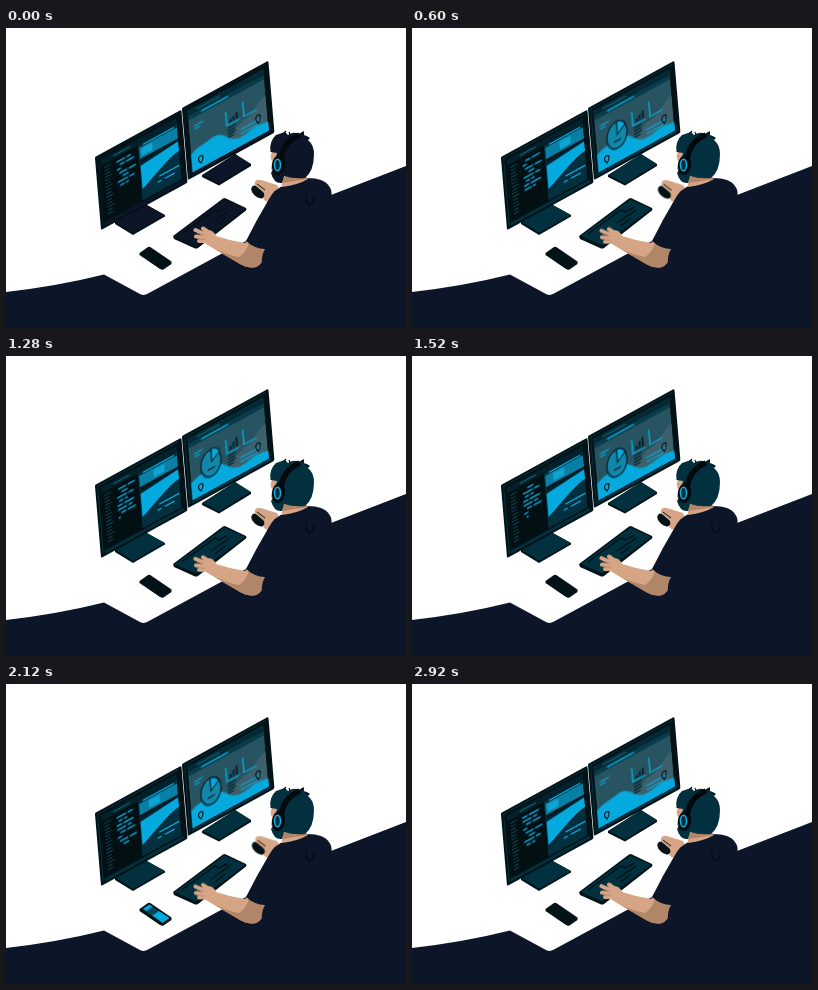
Write an HTML page that moves like this. It is 400x300 px and loops after 2960 ms.

```html
<!DOCTYPE html>
<html lang="en">
<head>
<meta charset="utf-8">
<title>Developer at work</title>
<style>
html, body { margin: 0; width: 100%; height: 100%; overflow: hidden; background: #fff; }
svg { display: block; width: 100vw; height: 100vh; }
:root { --navy: #0c1628; --teal: #03303e; --ink: #021216; --cyan: #04aadd; --skin: #d6a586; --shade: #b18568; }
.anim, .tint, .row { animation: 2960ms linear infinite; }
.tint { fill: var(--teal); animation-name: tint; }
.navy { fill: var(--navy); }
.ink { fill: var(--ink); }
.cyan { fill: var(--cyan); }
.skin { fill: var(--skin); }
.shade { fill: var(--shade); }
.line { fill: none; stroke: var(--cyan); stroke-width: 1.3; }
.dark { fill: none; stroke: #032029; stroke-width: 1.2; }
.digits { fill: none; stroke: var(--skin); stroke-width: 4; stroke-linecap: round; stroke-linejoin: round; }
.scroll { animation-name: scroll; animation-timing-function: steps(8); }
.row { animation-name: type; transform-box: fill-box; transform-origin: left; }
.slide { animation-name: slide; }
.pie { animation-name: pie; transform-box: fill-box; transform-origin: center; }
.slice { animation-name: slice; }
.bar { animation-name: bar; transform-box: fill-box; transform-origin: bottom; }
.wave { animation-name: wave; }
.phone { animation-name: phone; }
.feed { animation-name: feed; }
.fold { animation-name: fold; }
.fingers { animation: tap 370ms ease-in-out infinite; }
.mouse { animation-name: nudge; animation-timing-function: ease-in-out; }
@keyframes tint { 0%, 1.34% { fill: #0c1628; } 1.35%, 100% { fill: #03303e; } }
@keyframes scroll { to { transform: translateY(-32px); } }
@keyframes type { 0% { transform: scaleX(0); } 10%, 100% { transform: none; } }
@keyframes slide {
  0%, 4%, 57%, 63%, 98%, 100% { transform: none; }
  12% { transform: translateX(5px); }
  20%, 45%, 77%, 90% { transform: translateX(12px); }
}
@keyframes pie { 0%, 2%, 98%, 100% { transform: scale(0); } 10%, 90% { transform: none; } }
@keyframes slice { 0%, 12% { transform: none; } 30%, 45% { transform: translate(1px, -1px); } 60%, 100% { transform: none; } }
@keyframes bar { 0%, 100% { transform: scaleY(.65); } 30% { transform: scaleY(.8); } 60% { transform: none; } 85% { transform: scaleY(.7); } }
@keyframes wave { 0%, 100% { transform: none; } 50% { transform: translateY(1px); } }
@keyframes phone { 0%, 56.6% { opacity: 0; } 58%, 93% { opacity: 1; } 95%, 100% { opacity: 0; } }
@keyframes feed { 0%, 60% { transform: none; } 75%, 100% { transform: translate(-5px, -3px); } }
@keyframes fold { 0%, 1.34% { opacity: 1; } 1.35%, 39.1% { opacity: 0; } 39.2%, 100% { opacity: 1; } }
@keyframes tap { 0%, 100% { transform: none; } 50% { transform: translateY(.8px); } }
@keyframes nudge { 0%, 50%, 100% { transform: none; } 20%, 80% { transform: translate(.6px, .3px); } }
</style>
</head>
<body>
<svg viewBox="0 0 400 300">
  <defs>
    <clipPath id="codeClip"><path d="M17 13H41V44H17Z"/></clipPath>
    <clipPath id="screenClip"><path d="M4 4H80V65H4Z"/></clipPath>
    <clipPath id="phoneClip"><path d="M136.500 225L143.500 220.500L163.500 234L156.500 239Z"/></clipPath>
  </defs>

  <!-- desk edge and chair side -->
  <path class="navy" d="M0 264Q52 258 98 246.500L134 266Q138 268 142 265.500L215 226L240 213L325 167L400 138V300H0Z"/>

  <!-- stands -->
  <path class="ink" d="M109 194L139 176L159 187V188.500L127 207L109 196Z"/>
  <path class="tint" d="M110 194L139 176L158.500 187L127 205Z"/>
  <path class="ink" d="M196 147L229 126L245 136V138L213 157.500L196 149Z"/>
  <path class="tint" d="M197 147L229 126L244.500 136L213 155.500Z"/>

  <!-- left monitor -->
  <g transform="matrix(1 -.5476 .0845 1 90 130)">
    <path class="ink" d="M0 -1.500H84Q85.500 -1.500 85.500 0V70Q85.500 71.500 84 71.500H.5Q-1 71.500 -1 70V0Q-1 -1.500 0 -1.500Z"/>
    <path class="tint" d="M1 .5H83V1.500H2V69H1ZM3 66.500H82V69.500H3Z"/>
    <g clip-path="url(#screenClip)">
      <path fill="#021014" d="M4 4H41V65H4Z"/>
      <path fill="#032f3f" d="M41 4H80V65H41Z"/>
      <path fill="#03212a" d="M4 4H80V10H4Z"/>
      <path fill="#087fa5" d="M42 13H80V24H42Z"/>
      <path class="anim slide" fill="#10a4d2" d="M44 14.500H55V22H44Z"/>
      <path class="cyan" d="M42 31L80 27V36.500C70 37 56 47 42 54Z"/>
      <path fill="#021a22" d="M42 24.500H80V26.500L42 28.500Z"/>
      <path class="line" d="M46 11.500H77M59 50.500H79M64 55.500H74M57 55.500H61" stroke-width="1"/>
      <path class="line" style="stroke:#0c6179" d="M17 7H33" stroke-width="1"/>
    </g>
    <g id="side" fill="#0c414f"></g>
    <g clip-path="url(#codeClip)"><g id="code" class="anim scroll cyan"></g></g>
  </g>

  <!-- right monitor -->
  <g transform="matrix(1 -.5476 .0845 1 177 81)">
    <path class="ink" d="M0 -1.500H84Q85.500 -1.500 85.500 0V69Q85.500 70.500 84 70.500H.5Q-1 70.500 -1 69V0Q-1 -1.500 0 -1.500Z"/>
    <path class="tint" d="M1 .5H83V1.500H2V68H1ZM3 66H82V68.500H3Z"/>
    <g clip-path="url(#screenClip)">
      <path fill="#285361" d="M4 4H80V65H4Z"/>
      <path fill="#032a36" d="M4 4H80V10H4Z"/>
      <path fill="#083c4a" d="M4 10H80V14H4Z"/>
      <path fill="#3c606c" d="M34 57C46 50 52 42 60 42S70 32 80 30V65H34Z"/>
      <path class="anim wave cyan" d="M4 48C12 43 16 45 24 43S36 46 42 52S54 58 62 56S74 55 81 57V68H4Z"/>
      <path class="line" d="M17 11.500H44M9 22H18M9 25H15M53 50H74M53 54H70"/>
      <path class="line" style="stroke:#0c6179" d="M13 7H36"/>
      <path class="dark" d="M69 9H71M73 9H75M77 9H79" stroke-width="2"/>
      <path class="dark" d="M41 42H49M41 45H48M41 48H49M41 51H47"/>
      <path class="line" stroke-width="1.500" d="M40.500 25V39H53M57.500 24.500V39H70"/>
      <g fill="#03222d">
        <path class="anim bar" d="M43.500 33H45.500V37.500H43.500Z"/>
        <path class="anim bar" d="M46.700 30H48.700V37.500H46.700Z"/>
        <path class="anim bar" d="M49.900 27H51.900V37.500H49.900Z"/>
      </g>
      <path class="dark" d="M13 61C10 58 10 54 13 54S16 58 13 61ZM71 53C68 50 68 45 71 45S74 50 71 53Z"/>
      <g class="anim pie">
        <ellipse cx="24.600" cy="39.500" rx="10" ry="13" fill="#1287aa" stroke="#032029" stroke-width="1.300"/>
        <g class="anim slice">
          <path class="cyan" d="M24.600 39.500V26.500Q30 27 33 33Z" stroke="#032029" stroke-width="1.200"/>
        </g>
        <path class="dark" d="M21 45H28"/>
      </g>
    </g>
  </g>

  <!-- keyboard -->
  <path class="ink" d="M167 208L217 170.500Q218.500 169.500 220 170.500L240 180Q241 181 240 182.500L192 220Q190 221 188 220L168 211Z"/>
  <path class="tint" d="M169 208L218.500 171.500L239 181L190 217.500Z"/>
  <path d="M176 206L209 182L213 184L222 179.500M205 195L224 182M209 198L219 190" fill="none" stroke="#021216" stroke-width="1.500"/>

  <!-- phone -->
  <path class="ink" d="M133.500 225L142 219Q143.500 218.500 145 219.500L165.500 233.500V236L157.500 241.500Q156 242 154 241L133.500 227Z"/>
  <g class="anim phone" clip-path="url(#phoneClip)">
    <path fill="#06465a" d="M136 225L143.500 220L164 234L156 240Z"/>
    <g class="anim feed">
      <path class="cyan" d="M140 226L146.500 221.500L151 224.500L144 229.500Z"/>
      <path class="cyan" d="M150 234L157.500 229L172 238L164 244Z"/>
    </g>
  </g>

  <!-- mouse hand -->
  <g class="anim mouse">
    <ellipse class="ink" cx="252" cy="164" rx="8" ry="4.800" transform="rotate(42 252 164)"/>
    <path class="skin" d="M249 154Q250 151 255 152L271 157L274 163L264 174Q258 174 257 170Q260 167 257 164L251 159Q248 157 249 154Z"/>
    <path d="M251 156L259 162" fill="none" stroke="#021216" stroke-width="1"/>
  </g>

  <!-- typing arm -->
  <path class="skin" d="M198 203Q207 200 210 208Q225 213 239 215L244 209L260 219Q258 236 250 239Q243 241 234 236L210 222L200 216Q195 210 198 203Z"/>
  <path class="shade" d="M233 229Q241 224 243 214L260 219Q258 236 250 239Q243 241 234 236L209 221Q222 227 233 229Z"/>
  <g class="fingers">
    <path class="digits" d="M205 206L197 200.500M203 208L189.500 202M202 210L190 208.500M202 213L193 213"/>
    <path d="M191 205.500L198 207M193 211L199 211.500" fill="none" stroke="#b18568" stroke-width=".8"/>
  </g>

  <!-- body -->
  <path class="navy" d="M240 213Q251 191 263 171Q268 161 279 157L301 150Q318 150 323 158Q327 163 325 172L312 250H235L256 236Q255 228 259 221Q249 221 240 213Z"/>
  <path class="anim fold" d="M300 166Q299 175 304 177Q309 175 308 169" fill="none" stroke="#030811" stroke-width="1.100"/>

  <!-- head -->
  <path class="skin" d="M276 146L299 148L302 151Q292 157 276 159Z"/>
  <path class="shade" d="M277 149L299 147L302 151Q288 153 277 155Z"/>
  <path class="skin" d="M268 119L264.500 128L266 134L265 140L267 148L277 149V120Z"/>
  <path class="tint" d="M264.500 124Q263 113 270 107L279 104L282 107Q288 103 293 106L298 103L298 107L304 110L302 112Q308 117 308 126Q308 143 299 150Q287 151 278 148L276 155Q268 156 265 145L268 140L271 125Z"/>
  <path d="M277 106L280 103M284 107L283 104M294 107L297 104M299 108L303 110" fill="none" stroke="#021216" stroke-width="1.200"/>
  <path d="M275 134Q276 114 294 107" fill="none" stroke="#03090d" stroke-width="5.500"/>
  <ellipse cx="272.500" cy="137" rx="6.500" ry="10" fill="#03090d" transform="rotate(8 272.500 137)"/>
  <ellipse cx="271.500" cy="137" rx="3" ry="5.800" fill="#03303e" stroke="#0cafe0" stroke-width="1.600"/>
</svg>
<script>
const rect = (parent, x, y, w, h) => {
  const r = document.createElementNS("http://www.w3.org/2000/svg", "rect");
  Object.entries({ x, y, width: w, height: h }).forEach(([k, v]) => r.setAttribute(k, v));
  parent.append(r);
};

const side = document.getElementById("side");
for (let i = 0; i < 15; i++) rect(side, 7, 13 + i * 3.3, i % 3 ? 5 : 6.5, 1.1);

// Indent, first word and second word of each code row.
const rows = [[0, 5, 10], [0, 9, 4], [3, 5, 8], [0, 4, 0], [2, 8, 7], [5, 6, 0], [0, 10, 5], [2, 4, 3]];
const code = document.getElementById("code");
for (let i = 0; i < 16; i++) {
  const [indent, first, second] = rows[i % 8];
  const g = document.createElementNS("http://www.w3.org/2000/svg", "g");
  const x = 19 + indent, y = 10 + i * 4;
  rect(g, x, y, first, 1.5);
  if (second) rect(g, x + first + 1.5, y, second, 1.5);
  if (i > 7) {
    g.setAttribute("class", "row");
    g.style.animationDelay = (i - 8) * 370 - (i > 8 ? 2960 : 0) + "ms";
  }
  code.append(g);
}
</script>
</body>
</html>
```
